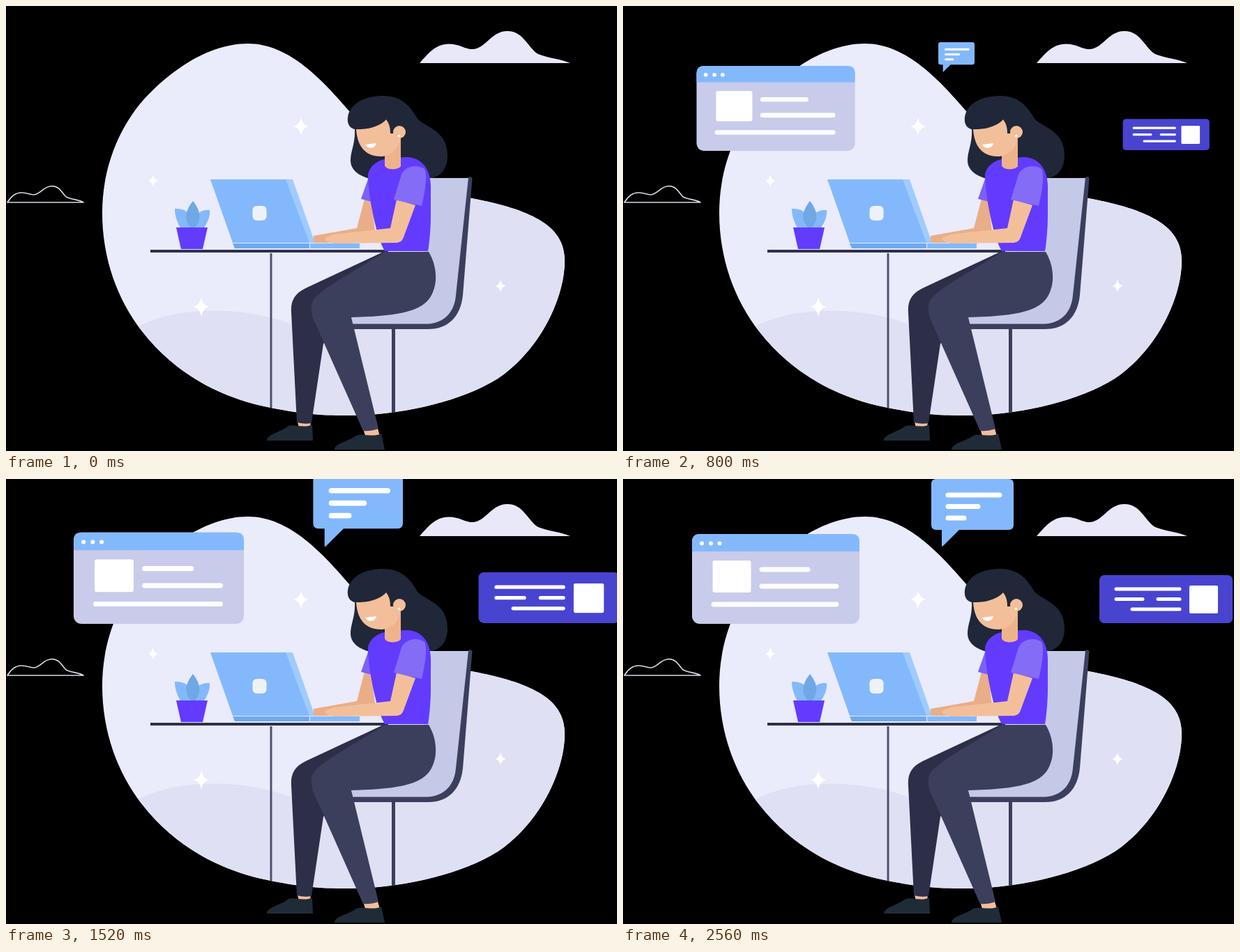
Write an HTML page that moves like this. It is 876 px wide and 639 px high and loops after 2.72 s.

```html
<!DOCTYPE html>
<html lang="en">
<head>
<meta charset="utf-8">
<title>Working at a laptop</title>
<style>
  html, body { margin: 0; width: 100%; height: 100%; overflow: hidden; background: #000; }
  svg { display: block; width: 100vw; height: 100vh; }
  .line { fill: none; stroke: #fff; stroke-linecap: round; }
</style>
</head>
<body>
<svg viewBox="0 0 876 639" xmlns="http://www.w3.org/2000/svg">
  <defs>
    <path id="blob" d="M347 54C285 54 228 100 196 136C159 179 138 237 138 297C138 363 160 422 195 467C237 521 298 561 380 577C430 587 460 588 490 588C560 588 650 570 705 535C765 495 801 420 801 366C801 320 763 294 667 276C600 262 560 230 494 153C455 108 407 54 347 54Z"/>
    <clipPath id="inBlob"><use href="#blob"/></clipPath>
    <path id="spark" d="M0-13Q2-2 11 0Q2 2 0 13Q-2 2-11 0Q-2-2 0-13Z" fill="#fff"/>
  </defs>
  <rect width="876" height="639"/>

  <!-- backdrop -->
  <use href="#blob" fill="#eaebfb"/>
  <path clip-path="url(#inBlob)" fill="#e0e0f4" d="M184 463C240 430 340 430 410 457L500 440L640 250H900V639H150Z"/>
  <path fill="#e8e8f9" d="M593 82C604 70 615 54.500 635 54.500C650 54.500 658 62 668 62C688 62 695 36 719 36C742 36 748 60 763 69C778 75 795 76 809 82Z"/>
  <path fill="none" stroke="#d8d8e4" stroke-width="1.700" stroke-linejoin="round" d="M2 282C8 272 14 268 22 268C30 268 35 271 40 271C50 270 54 258.500 66 258.500C77 259 80 268 86 274C94 278 104 278 111 282Z"/>
  <use href="#spark" transform="translate(423 173)"/>
  <use href="#spark" transform="translate(211 251) scale(.7)"/>
  <use href="#spark" transform="translate(280 432) scale(1.03)"/>
  <use href="#spark" transform="translate(709 402) scale(.72)"/>

  <!-- pop-up panels -->
  <g id="page">
    <rect x="99" y="79" width="240" height="129" rx="11" fill="#c8cbea"/>
    <path fill="#83b9fc" d="M99 104V90Q99 79 110 79H328Q339 79 339 90V104Z"/>
    <path class="line" stroke-width="6" d="M113 92.500h.01M126 92.500h.01M138.500 92.500h.01"/>
    <rect x="128.500" y="117" width="55" height="46" rx="3" fill="#fff"/>
    <path class="line" stroke-width="7" d="M199 130H265M199 154H306M130 180H306"/>
  </g>
  <g id="card">
    <rect x="683" y="138" width="191" height="69" rx="7" fill="#4844d0"/>
    <path class="line" stroke-width="5" d="M707 158H798M707 172.500H745M767 172.500H798M730 187H798"/>
    <rect x="812" y="153" width="41" height="40" rx="2" fill="#fff"/>
  </g>
  <g id="chat">
    <path fill="#83b9fc" d="M449 0H553Q560 0 560 7V66Q560 73 553 73H482L458 97Q457 97 457 95V73H449Q442 73 442 66V7Q442 0 449 0Z"/>
    <path class="line" stroke-width="7" d="M466 23H540M466 39.500H509M466 56H489"/>
  </g>

  <!-- chair -->
  <path fill="#c5c9e8" d="M596 247H665L649 415C646 442 630 458 605 458H490V436L600 420Z"/>
  <path fill="#3c3f5c" d="M663 246Q666 244 668.500 247L655 415C652 446 634 464 605 464H497V456.500H604C628 455.500 643 440 645 415Z"/>
  <path stroke="#3c3f5c" stroke-width="5" d="M555.500 463V584"/>

  <!-- desk -->
  <path stroke="#50526f" stroke-width="3" d="M380 355V577"/>
  <path stroke="#2d2f50" stroke-width="4" d="M207 352H548"/>
  <path fill="#83b9fc" d="M242 291C262 290 268 303 266 318H250C245 310 242 300 242 291ZM292 293C275 292 268 303 268 318H284C290 310 293 300 292 293Z"/>
  <path fill="#70a8e6" d="M268 280C255 297 256 308 265 318H271C280 308 280 295 268 280Z"/>
  <path fill="#623bff" d="M244 318H289L282 349H251Z"/>

  <!-- laptop -->
  <path fill="#9fcbff" d="M398 249H411L443 340H425Z"/>
  <path fill="#83b9fc" d="M293 249H401L435 340H325Z"/>
  <path fill="#6fa9ee" d="M325 341H436V348H328Z"/>
  <path fill="#83b9fc" d="M436 341H507V348H436Z"/>
  <path stroke="#d9ebff" stroke-width="1.200" d="M323 340.500H507M435.500 341V348"/>
  <rect x="353.500" y="287" width="20" height="21" rx="6" fill="#eef2f6"/>

  <!-- legs -->
  <path fill="#f3bf9b" d="M418 597H437L436 606H420ZM512 607H533L536 617H515Z"/>
  <path fill="#2c2f47" d="M541 353L430 405C413 413 408 424 409 440L417 598Q428 601 438 599L455 485L520 400L560 353Z"/>
  <path fill="#3c3f5c" d="M543 353H606C618 373 618 395 613 408C604 436 575 445 495 447L534 607Q522 611 512 610L440 448C436 433 437 423 447 415C470 395 515 372 543 353Z"/>
  <path fill="#1f2c38" d="M374 624C374 615 396 611 405 603C414 600 428 607 439 601L440 624ZM471 637C471 628 492 625 502 617C512 613 526 620 538 614L543 637Z"/>

  <!-- upper body -->
  <path fill="#1f2739" d="M490 160C492 140 515 129 541 129C570 129 582 148 590 162C602 175 633 178 633 215C633 232 624 246 608 247L525 249C505 244 494 235 494 222C494 208 501 198 500 177C492 175 489 168 490 160Z"/>
  <path id="farArm" fill="#e9ae87"/>
  <path fill="#7b61f6" d="M521 243L509 277L524 281Z"/>
  <path fill="#623bff" d="M519 242C522 226 538 219 555 218L575 217C597 218 609 235 609 260V300C609 320 607 340 605 352H543C530 330 519 270 519 242Z"/>
  <path fill="#efb38b" d="M543 188H566V230C562 236 545 236 543 229Z"/>
  <path fill="#f3bf9b" d="M502 177C522 178 538 171 545 163C549 168 551 174 551 183H558L565 190C563 206 552 214 540 216C517 217 504 204 502 177Z"/>
  <circle cx="564" cy="181" r="9" fill="#f3bf9b"/>
  <circle cx="563.500" cy="186.500" r="1.800" fill="#fff"/>
  <path fill="#fff" d="M515 199L531 197C530 205 518 206 515 199Z"/>
  <path id="nearArm" fill="#f3bf9b"/>
  <path fill="#846cf7" d="M556 278L567 242C573 229 590 227 600 234C605 243 600 270 596 287Z"/>
</svg>
<script>
  const STEP = 80, LOOP = 2720, LAST = 2560;
  const $ = id => document.getElementById(id);

  // each panel grows from (x, y); keys are [ms, scale]
  const panels = [
    { el: $('page'), x: 219, y: 208, keys: [[200, 0], [480, .48], [560, .615], [800, .946], [1120, 1.092], [1200, 1.083], [1520, 1.017], [1760, 1.006], [2240, 1]] },
    { el: $('card'), x: 779, y: 207, keys: [[340, 0], [480, .178], [560, .29], [800, .65], [1200, 1.1], [1290, 1.105], [1520, 1.057], [1760, 1.026], [2240, 1]] },
    { el: $('chat'), x: 460, y: 93, keys: [[430, 0], [480, .05], [560, .12], [800, .44], [1120, .914], [1200, 1.008], [1430, 1.1], [1520, 1.09], [1760, 1.034], [2240, 1.008], [2560, 1]] }
  ];

  // smooth curve through the keys
  function ease(keys, t) {
    const end = keys.length - 1;
    if (t <= keys[0][0]) return keys[0][1];
    if (t >= keys[end][0]) return keys[end][1];
    const i = keys.findIndex(k => k[0] > t) - 1;
    const slope = n => {
      const a = keys[Math.max(n - 1, 0)], b = keys[Math.min(n + 1, end)];
      return (b[1] - a[1]) / (b[0] - a[0]);
    };
    const [t0, v0] = keys[i], [t1, v1] = keys[i + 1];
    const d = t1 - t0, u = (t - t0) / d, w = 1 - u;
    return w * w * ((1 + 2 * u) * v0 + u * d * slope(i)) +
           u * u * ((3 - 2 * u) * v1 - w * d * slope(i + 1));
  }

  function farArm(lift) {
    return `M514 277L524 281L529 322L500 340H441V${330 - lift}L503 319Z`;
  }

  function nearArm(up) {
    const hand = up
      ? 'L496 341L477 337L459 327C463 317 473 317 480 321L491 324'
      : 'L475 341C465 341 458 339 457 333L470 328';
    return `M560 278L587 286L570 332C568 338 564 340 558 340${hand}L551 319Z`;
  }

  function draw(ms) {
    const t = Math.min(Math.floor(ms % LOOP / STEP) * STEP, LAST);
    for (const { el, x, y, keys } of panels) {
      const s = ease(keys, t);
      el.setAttribute('display', s > 0 ? 'inline' : 'none');
      el.setAttribute('transform', `translate(${x} ${y}) scale(${s}) translate(${-x} ${-y})`);
    }
    const beat = t / STEP % 5;
    $('nearArm').setAttribute('d', nearArm(beat === 1));
    $('farArm').setAttribute('d', farArm(beat === 3 ? 3 : 0));
  }

  const start = performance.now();
  function tick() {
    draw(performance.now() - start);
    requestAnimationFrame(tick);
  }
  tick();
</script>
</body>
</html>
```
